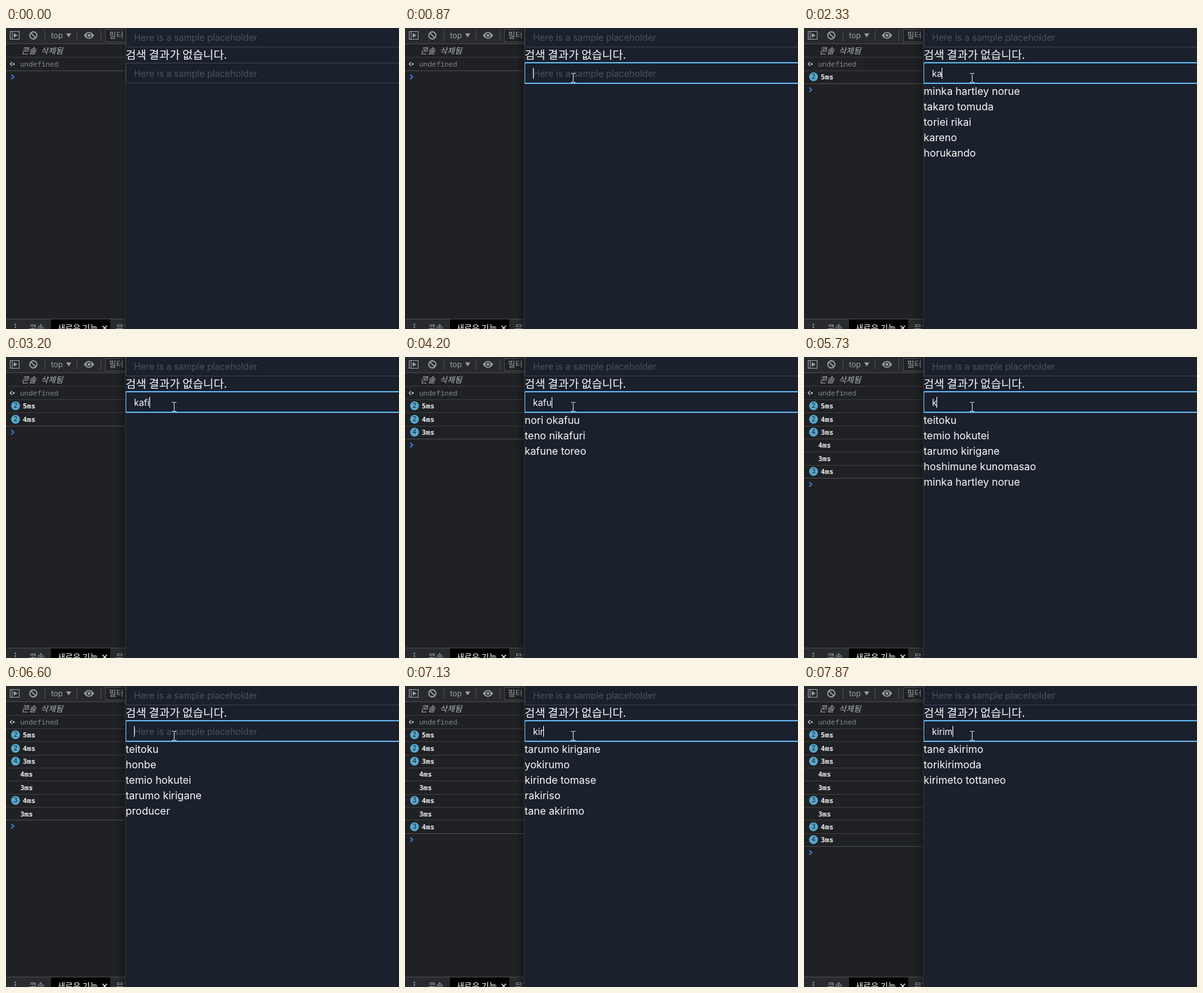
An HTML page with a canvas that plays this animation: 611x468 px, repeating every 8000 ms.

```html
<!DOCTYPE html>
<html lang="ko">
<head>
<meta charset="utf-8">
<title>Search demo</title>
<style>
  html, body { margin: 0; width: 611px; height: 468px; overflow: hidden; background: #202124; }
  canvas { display: block; }
</style>
</head>
<body>
<canvas id="stage" width="611" height="468"></canvas>
<script>
const ctx = document.getElementById('stage').getContext('2d', { alpha: false });
const W = 611, H = 468, PAGE_X = 186, LOOP = 8000;
const SANS = 'Inter, "Noto Sans CJK KR", sans-serif';
const KOREAN = '"Noto Sans CJK KR", "Noto Sans CJK", "Noto Sans CJK JP", sans-serif';
const MONO = '"Noto Sans Mono", "DejaVu Sans Mono", monospace';
const GREY = '#9aa0a6', DIVIDER = '#494c50', BRIGHT = '#fafafa';
const PLACEHOLDER = 'Here is a sample placeholder';

const people = [
  'teitoku', 'honbe', 'temio hokutei', 'tarumo kirigane', 'producer',
  'hoshimune kunomasao', 'minka hartley norue', 'takaro tomuda', 'toriei rikai',
  'kareno', 'horukando', 'nori okafuu', 'teno nikafuri', 'kafune toreo', 'sekafo',
  'yuki tanomeda', 'yokirumo', 'kirinde tomase', 'rakiriso',
  'tane akirimo', 'torikirimoda', 'kirimeto tottaneo'
];

// [time, query, logged milliseconds]
const edits = [
  [1670, 'k', 5], [2270, 'ka', 5], [2800, 'kaf', 4], [3200, 'kafi', 4],
  [3530, 'kafil', 3], [3870, 'kafi', 3], [4000, 'kaf', 3], [4200, 'kafu', 3],
  [4470, 'kafuu', 4], [5200, 'kafu', 3], [5400, 'kaf', 4], [5600, 'ka', 4],
  [5730, 'k', 4], [5930, '', 3], [6670, 'k', 4], [6800, 'ki', 4],
  [7130, 'kir', 4], [7400, 'kiri', 3], [7600, 'kirin', 3], [7670, 'kiri', 3],
  [7870, 'kirim', 3]
];
const FOCUS = 730;
const caretOff = [[0, FOCUS], [1200, 1730], [2270, 2330], [3530, 3600], [5000, 5530], [6070, 6600]];
const mouse = { start: 200, end: 870, from: [618, 300], to: [261, 77] };

function rect(x, y, w, h, color) {
  ctx.fillStyle = color;
  ctx.fillRect(x, y, w, h);
}

function text(str, x, y, font, color) {
  ctx.font = font;
  ctx.fillStyle = color;
  ctx.fillText(str, x, y);
}

function path(points, color, width, close) {
  ctx.beginPath();
  points.forEach(([x, y]) => ctx.lineTo(x, y));
  if (close) ctx.closePath();
  ctx.strokeStyle = color;
  ctx.lineWidth = width;
  ctx.stroke();
}

function disc(x, y, r, color) {
  ctx.beginPath();
  ctx.arc(x, y, r, 0, Math.PI * 2);
  ctx.fillStyle = color;
  ctx.fill();
}

function polygon(points, color) {
  ctx.beginPath();
  points.forEach(([x, y]) => ctx.lineTo(x, y));
  ctx.fillStyle = color;
  ctx.fill();
}

function drawToolbar() {
  rect(0, 0, PAGE_X, 24, '#292a2d');
  rect(0, 24, PAGE_X, 1, DIVIDER);
  [60, 110, 147].forEach(x => rect(x, 3, 1, 17, DIVIDER));

  ctx.strokeStyle = GREY;
  ctx.lineWidth = 1;
  ctx.strokeRect(6.5, 5.5, 14, 12);
  rect(9, 6, 1, 11, GREY);
  polygon([[12, 8], [18, 11.5], [12, 15]], GREY);

  ctx.beginPath();
  ctx.arc(42.5, 11.5, 5.5, 0, Math.PI * 2);
  ctx.lineWidth = 1.8;
  ctx.stroke();
  path([[38.6, 7.6], [46.4, 15.4]], GREY, 1.8);

  text('top', 70, 16, '12px ' + SANS, GREY);
  polygon([[93.5, 8.5], [101.5, 8.5], [97.5, 14.5]], GREY);

  ctx.beginPath();
  ctx.moveTo(121, 11.5);
  ctx.quadraticCurveTo(129, 1, 137, 11.5);
  ctx.quadraticCurveTo(129, 22, 121, 11.5);
  ctx.fillStyle = GREY;
  ctx.fill();
  disc(129, 11.5, 3.8, '#292a2d');
  disc(129, 11.5, 2.2, GREY);

  rect(154, 2, 40, 20, '#202124');
  ctx.strokeStyle = DIVIDER;
  ctx.lineWidth = 1;
  ctx.strokeRect(154.5, 2.5, 40, 19);
  text('필터', 160, 16, '12.5px ' + KOREAN, GREY);
}

function drawDrawer() {
  rect(0, 452, PAGE_X, 16, '#292a2d');
  rect(0, 452, PAGE_X, 1, DIVIDER);
  rect(70, 453, 92, 15, '#000');
  [461, 465, 469].forEach(y => disc(14.5, y, 1.2, GREY));
  const font = '13px ' + KOREAN;
  text('콘솔', 36, 471, font, GREY);
  text('새로운 기능', 80, 471, font, BRIGHT);
  text('문제', 171, 471, font, GREY);
  path([[150, 463], [157, 470]], '#e8eaed', 1.4);
  path([[157, 463], [150, 470]], '#e8eaed', 1.4);
}

function groupLogs(done) {
  const rows = [];
  for (const [, , ms] of done) {
    const last = rows[rows.length - 1];
    if (last && last.ms === ms) last.count++;
    else rows.push({ ms, count: 1 });
  }
  return rows;
}

function drawConsole(rows) {
  const step = 20.35;
  const line = (y, color = '#3c3d3f') => rect(0, Math.round(y), PAGE_X, 1, color);
  const italic = 'italic 12.5px ' + KOREAN;
  text('콘솔', 24, 40, italic, '#b4b8bc');
  text('삭제됨', 54, 40, italic, '#b4b8bc');
  line(45);
  path([[9.5, 53], [6.5, 56], [9.5, 59]], '#c4c7ca', 1.3);
  disc(12, 56, 1.6, '#c4c7ca');
  text('undefined', 22, 60, '11px ' + MONO, '#80868b');

  rows.forEach(({ ms, count }, i) => {
    const y = Math.round(76.4 + step * i);
    line(66 + step * i);
    if (count > 1) {
      disc(14.8, y - 0.2, 6.9, '#56a9d0');
      ctx.textAlign = 'center';
      text(count, 14.8, y + 3.4, '10px ' + SANS, '#202124');
      ctx.textAlign = 'left';
    }
    text(ms + 'ms', count > 1 ? 26 : 22, y + 4, 'bold 11px ' + MONO, '#e8eaed');
  });
  line(66 + step * rows.length, DIVIDER);
  const y = Math.round(76 + step * rows.length);
  path([[8.2, y - 3.5], [12, y], [8.2, y + 3.5]], '#3b7de0', 1.7);
}

function drawWindowEdge(focused) {
  const size = focused ? 14 : 7;
  const fade = ctx.createLinearGradient(PAGE_X - size, 0, PAGE_X, 0);
  fade.addColorStop(0, 'rgba(0,0,0,0)');
  fade.addColorStop(1, focused ? 'rgba(0,0,0,.3)' : 'rgba(0,0,0,.2)');
  rect(PAGE_X - size, 0, size, H, fade);
  rect(PAGE_X - 1, 0, 1, H, '#2f3236');
}

function drawInput(y, value, focused, caret) {
  ctx.strokeStyle = focused ? '#63b3ed' : '#3f444e';
  ctx.lineWidth = focused ? 2 : 1;
  const inset = focused ? 0 : 0.5;
  ctx.beginPath();
  ctx.roundRect(PAGE_X + inset, y + inset, W - PAGE_X + 20, 32 - inset * 2, 2);
  ctx.stroke();
  const font = '14px ' + SANS;
  if (value) text(value, 199, y + 22, font, BRIGHT);
  else text(PLACEHOLDER, 199, y + 22, font, '#4e535d');
  if (caret) {
    ctx.font = font;
    rect(Math.floor(199 + ctx.measureText(value).width), y + 8, 1, 17, '#fff');
  }
}

function drawMouse(t) {
  if (t < mouse.start) return;
  const stepped = Math.floor((t - mouse.start) / 66.7) * 66.7;
  const p = Math.min(1, (stepped + 66.7) / (mouse.end - mouse.start));
  const ease = 1 - (1 - p) ** 3;
  const [x, y] = mouse.from.map((v, i) => Math.round(v + (mouse.to[i] - v) * ease));
  if (y > 54 && y < 86) {
    rect(x, y - 6, 1, 13, '#e4e6e8');
    [y - 7, y + 7].forEach(edge => {
      rect(x - 3, edge, 3, 1, '#e4e6e8');
      rect(x + 1, edge, 3, 1, '#e4e6e8');
    });
    return;
  }
  const arrow = [[0, 0], [0, 16], [4, 12.5], [6.5, 18], [9, 17], [6.5, 11.5], [11.5, 11.5]]
    .map(([dx, dy]) => [x + dx, y + dy]);
  polygon(arrow, '#fff');
  path(arrow, '#000', 1, true);
}

function drawPage(t, query) {
  const focused = t >= FOCUS;
  const caret = !caretOff.some(([from, to]) => t >= from && t < to);
  ctx.save();
  ctx.beginPath();
  ctx.rect(PAGE_X, 0, W - PAGE_X, H);
  ctx.clip();
  rect(PAGE_X, 0, W - PAGE_X, H, '#1a202c');
  drawInput(-2, '', false, false);
  text('검색 결과가 없습니다.', PAGE_X, 48, '17.5px ' + KOREAN, BRIGHT);
  drawInput(54, query || '', focused, caret);
  if (query !== null) {
    people.filter(name => name.includes(query)).slice(0, 5)
      .forEach((name, i) => text(name, PAGE_X, 104 + 24 * i, '16px ' + SANS, BRIGHT));
  }
  drawMouse(t);
  ctx.restore();
}

function draw() {
  const t = (performance.now() + 3) % LOOP;
  const done = edits.filter(([time]) => time <= t);
  const query = done.length ? done[done.length - 1][1] : null;
  rect(0, 0, W, H, '#202124');
  drawToolbar();
  drawConsole(groupLogs(done));
  drawDrawer();
  drawWindowEdge(t >= FOCUS);
  drawPage(t, query);
  requestAnimationFrame(draw);
}
draw();
</script>
</body>
</html>
```
